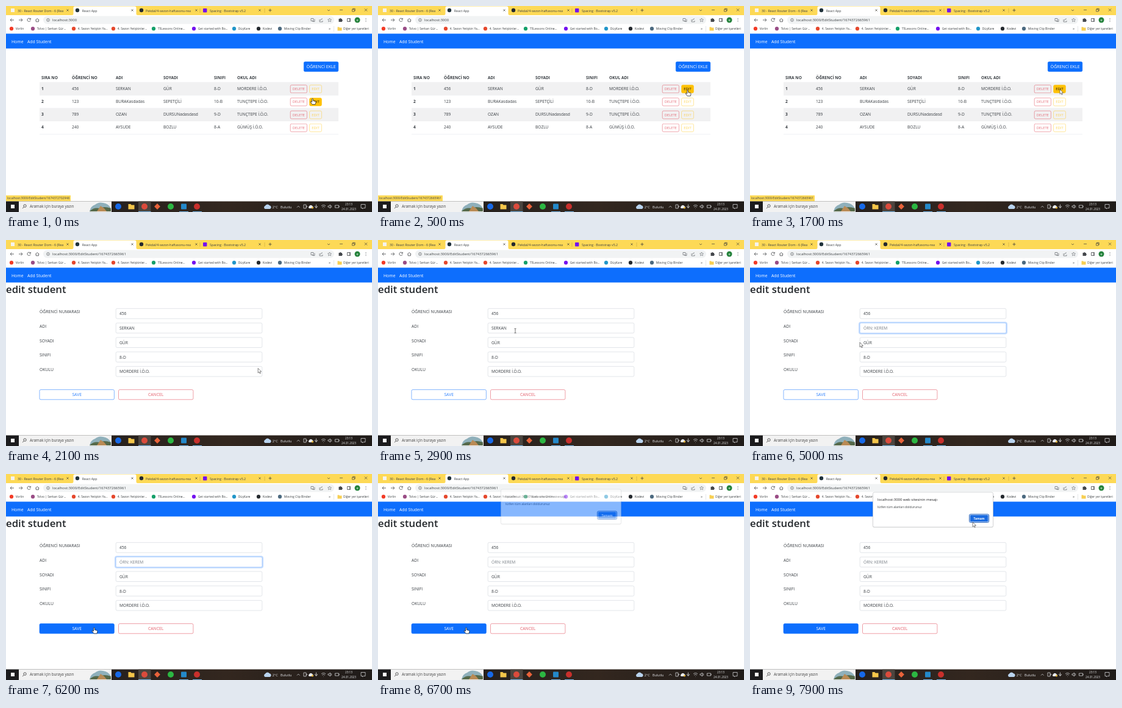
An HTML page that plays this animation: 600x338 px, repeating every 8000 ms.

```html
<!DOCTYPE html>
<html lang="tr">
<head>
<meta charset="utf-8">
<title>React App</title>
<style>
  html, body { margin: 0; width: 100%; height: 100%; overflow: hidden; background: #fff; }
  svg { display: block; width: 100vw; height: 100vh; }
  text { font-family: "Open Sans", "Noto Sans", sans-serif; white-space: pre; }
</style>
</head>
<body>
<svg id="stage" viewBox="0 0 600 338"></svg>
<script>
const LOOP = 8000, TICK = 100;
const INK = '#3a3f44', BLUE = '#0d6efd', RED = '#dc3545', AMBER = '#ffc107', FRAME = '#fdd956';

const box = (x, y, w, h, fill, more = '') =>
  `<rect x="${x}" y="${y}" width="${w}" height="${h}" fill="${fill}" ${more}/>`;
const dot = (x, y, r, fill, more = '') =>
  `<circle cx="${x}" cy="${y}" r="${r}" fill="${fill}" ${more}/>`;
const line = (d, color = '#5f6368', w = 0.8) =>
  `<path d="${d}" fill="none" stroke="${color}" stroke-width="${w}"/>`;
const text = (x, y, s, size = 6.8, fill = INK, more = '') =>
  `<text x="${x}" y="${y}" font-size="${size}" fill="${fill}" ${more}>${s}</text>`;
const MID = ' text-anchor="middle"', BOLD = ' font-weight="700"';

const cross = (x, y, r) => line(`M${x - r} ${y - r}l${2 * r} ${2 * r}m0 ${-2 * r}l${-2 * r} ${2 * r}`, '#44423a', 0.7);

function button(x, y, w, h, label, color, { size = 6.8, on = false, onText = '#fff', pale = 1 } = {}) {
  return `<g opacity="${on ? 1 : pale}">` +
    box(x, y, w, h, on ? color : 'none', `rx="2" stroke="${color}" stroke-width=".6"`) +
    text(x + w / 2, y + h / 2 + size * 0.36, label, size, on ? onText : color, MID) + '</g>';
}

// Browser window

function tabs() {
  const tab = (x, icon, title, closeX) => icon + text(x, 9.6, title, 5.3, '#3c4043') + cross(closeX, 7, 1.6);
  return box(0, 0, 600, 15, FRAME) +
    '<path d="M108 15q2.500 0 2.500-2.500V3q0-2.500 2.500-2.500h98q2.500 0 2.500 2.500v9.500q0 2.500 2.500 2.500z" fill="#fff"/>' +
    tab(19, box(8, 4, 6, 6, '#f5f3ef'), '30 - React Router Dom - 6 (Rea', 101) +
    tab(124.7, dot(117, 7, 3.2, '#20323b'), 'React App', 207) +
    tab(229, dot(222, 7, 3.2, '#24292e'), 'Pekdal/4-sezon-haftasonu-rea', 312) +
    tab(334, box(323, 4, 6.4, 6.4, '#7411f0', 'rx="1"'), 'Spacing · Bootstrap v5.2', 416) +
    line('M318 4v7M424 4v7', '#b59a3c', 0.5) +
    line('M430.500 7h5M433 4.500v5', '#44423a') +
    line('M527 6l2 2 2-2M547 6.500h5M567.500 5.500h3.500v3.500h-3.500zM568.500 5.500v-1.200h3.700V8H571', '#44423a', 0.7) +
    cross(590, 6.5, 2.1);
}

function toolbar(url) {
  return box(0, 15, 600, 30.4, '#fff') +
    line('M13 23H7m2.500-2.500L7 23l2.500 2.500M21 23h6m-2.500-2.500L27 23l-2.500 2.500', '#44474b') +
    line('M40 21.500a2.700 2.700 0 1 0 .2 2.200M40.400 19.800v2.200h-2.200M48.300 23.200l3-2.700 3 2.700M49.200 22.500v3.300h4.200v-3.300', '#44474b') +
    box(61, 16.5, 477, 13, '#f1f3f4', 'rx="6.5"') +
    dot(69, 23, 2.4, 'none', 'stroke="#5f6368" stroke-width=".7"') + line('M69 22.600v1.700M69 21.400v.6') +
    text(76, 25.2, url, 5.95, '#3c4043') +
    line('M500 20.500h4v4h-4zM502.500 25.500h3.500v-4M514 22v4h5v-2M515.500 24q0-3 3.500-3', '#5f6368', 0.7) +
    line('M530.500 20l.9 2 2.100.2-1.600 1.400.5 2.200-1.900-1.200-1.900 1.200.5-2.200-1.600-1.400 2.100-.2z', '#5f6368', 0.6) +
    '<path d="M545.500 21h1.700a1 1 0 0 1 2 0h1.700v1.700a1 1 0 0 1 0 2v1.300h-5.400z" fill="#44474b"/>' +
    line('M559.500 20.500h5v5h-5zM563 20.500v5', '#44474b') +
    dot(576, 23, 4.5, '#24823b') + text(576, 25, 'e', 5.5, '#fff', MID) +
    [20.7, 23, 25.3].map(y => dot(590, y, 0.6, '#5f6368')).join('');
}

function bookmarks() {
  const marks = [
    [9, '#f33b26', 'Vorlin'], [44, '#9a4d86', 'Tolvo | Serkan Gür...'],
    [111, '#e5482d', '4. Sezon Yetişkin Ya...'], [176, '#e5482d', '4. Sezon Yetişkinler...'],
    [242, '#15a06a', 'T5Lessons Online...'], [308, '#7411f0', 'Get started with Bo...'],
    [374, '#2196c9', 'DüşKare'], [414, '#24292e', 'Kodevi'], [449, '#4c6a80', 'Moving Clip Binder']
  ];
  return marks.map(([x, color, label]) => dot(x, 37.2, 3.1, color) + text(x + 6.7, 39, label, 5, '#3c4043')).join('') +
    text(529, 39.2, '»', 6, '#3c4043') + line('M537.500 33v9', '#d5d7da', 0.6) +
    '<path d="M543.500 34.500h2.500l1 1h3.500v5h-7z" fill="#f7cf52"/>' +
    text(553, 39, 'Diğer yer işaretleri', 4.9, '#3c4043');
}

function taskbar() {
  const icons = [[184, '#1769e8'], [227, '#db4b3c'], [270, '#2cb742'], [313, '#c8302c']];
  const white = '#e8eaed';
  return '<linearGradient id="bar"><stop stop-color="#1b1b1d"/><stop offset=".6" stop-color="#33271f"/>' +
    '<stop offset="1" stop-color="#1f1b19"/></linearGradient>' +
    box(0, 320.5, 600, 17.5, 'url(#bar)') +
    box(8, 326, 6, 6, '#fff') +
    box(21, 320.5, 152, 17.5, '#f2f2f2') +
    dot(31, 328, 2.2, 'none', 'stroke="#333" stroke-width=".8"') + line('M29.400 329.700l-2.400 2.500', '#333') +
    text(39, 331.3, 'Aramak için buraya yazın', 6.25, '#454545') +
    '<path d="M137 337q2-9 9-11 6-5 13-3 9 1 13 9v5z" fill="#8fb0bb"/>' +
    '<path d="M137 337q7-7 16-5 8-4 19 0v5z" fill="#55694a"/>' +
    '<path d="M149 337l6-9 6 4 4 5z" fill="#b98a55"/>' +
    box(217, 320.5, 20.5, 17.5, '#4c453f') +
    icons.map(([x, c]) => dot(x, 329, 5, c)).join('') +
    '<path d="M200.500 325h4l1 1.500h5v7h-10z" fill="#f5c64a"/>' +
    box(244.5, 325.5, 7, 7, '#e8623a', 'transform="rotate(45 248 329)"') +
    box(287, 324.5, 9, 9, '#2489ca', 'rx="1"') +
    [[217, 20.5], [284, 15], [306, 15]].map(([x, w]) => box(x, 337, w, 1, '#76b9ed')).join('') +
    '<path d="M425 333a2.700 2.700 0 0 1 0-5.200 4 4 0 0 1 7-.5 2.900 2.900 0 0 1 .5 5.700z" fill="#b9d3ee"/>' +
    text(436.7, 331.5, '2°C', 5.5, white) + text(450, 331.5, 'Bulutlu', 5.5, white) +
    line('M477 330.500l2.300-2.300 2.300 2.300M488 326h4v6h-4zM492 328l2 1-2 1.500', white, 0.7) +
    '<path d="M497 332a2 2 0 0 1 0-3.500 3 3 0 0 1 5.500 0 2 2 0 0 1 .5 3.500z" fill="#e8eaed"/>' +
    dot(502.5, 331, 1.5, '#f2b632') +
    line('M508.500 325.500v6m-1.700-3.500v2q1.700 2 3.400 0v-2', white, 0.7) +
    line('M517 328a5 5 0 0 1 7 0M518.300 330a3 3 0 0 1 4.400 0M520.500 332v.5', white, 0.7) +
    line('M528 328h1.500l2-2v6l-2-2H528zM533 327q1.500 2 0 4M539.500 327h6v4h-6zM546 328v2', white, 0.7) +
    text(562, 327.1, '23:13', 4.7, white, MID) + text(562, 335.3, '24.01.2023', 4.7, white, MID) +
    line('M582 325.500h7v6h-3l-1.500 1.500v-1.500H582z', white, 0.7);
}

const navbar = () => box(0, 45.4, 600, 24.3, BLUE) +
  text(9, 60.7, 'Home', 6.9, '#fff') + text(35, 60.7, 'Add Student', 6.85, '#fff');

// Pages

const COLS = [58, 108, 180, 258, 341, 379];
const HEADS = ['SIRA NO', 'ÖĞRENCİ NO', 'ADI', 'SOYADI', 'SINIFI', 'OKUL ADI'];
const STUDENTS = [
  ['456', 'SERKAN', 'GÜR', '8-D', 'MORDERE İ.Ö.O.'],
  ['123', 'BURAKasdadas', 'SEPETÇİLİ', '10-B', 'TUNÇTEPE İ.Ö.O.'],
  ['789', 'OZAN', 'DURSUNadasdasd', '9-D', 'TUNÇTEPE İ.Ö.O.'],
  ['240', 'AYSUDE', 'BOZLU', '8-A', 'GÜMÜŞ İ.Ö.O.']
];

function listPage(hot) {
  const row = (student, i) => {
    const y = 125.5 + i * 21.2;
    return box(55, y, 490, 21.2, i % 2 ? '#fff' : '#f1f1f2') +
      line(`M55 ${y + 21.2}h490`, '#dee2e6', 0.5) +
      [i + 1, ...student].map((s, c) => text(COLS[c], y + 12.1, s, 6.65, INK, c ? '' : BOLD)).join('') +
      button(466.2, y + 4.2, 27.2, 13, 'DELETE', RED, { size: 5.8, pale: 0.72 }) +
      button(497.6, y + 4.2, 19.8, 13, 'EDIT', AMBER, { size: 5.8, on: i === hot, onText: '#111', pale: 0.68 });
  };
  return button(488.3, 91.6, 56.5, 16, 'ÖĞRENCİ EKLE', BLUE, { on: true, size: 7.05 }) +
    HEADS.map((s, c) => text(COLS[c], 119.7, s, 6.55, INK, BOLD)).join('') +
    line('M55 125.300h490', '#dee2e6', 0.5) + STUDENTS.map(row).join('');
}

const LABELS = ['ÖĞRENCİ NUMARASI', 'ADI', 'SOYADI', 'SINIFI', 'OKULU'];

function formPage(t, pointerX) {
  const focus = t >= 3300 && t < 6600, empty = t >= 4300;
  const caret = (t >= 4300 && t < 5000) || (t >= 5500 && t < 6000);
  const field = (label, i) => {
    const y = 112.4 + i * 23.75, active = i === 1 && focus;
    const hint = i === 1 && empty;
    let out = text(55, y + 7.8, label, 6.85);
    if (active) out += box(179, y - 1, 242, 18.6, 'none', 'rx="2.800" stroke="#c2dbfe" stroke-width="2"');
    out += box(180.2, y, 239.6, 16.6, '#fff', `rx="2" stroke="${active ? '#86b7fe' : '#ced4da'}" stroke-width=".6"`);
    if (i === 1 && t >= 3400 && !empty) {
      const from = Math.max(185.5, Math.min(214, pointerX));
      out += box(from, y + 4, 214 - from, 9, '#a9cdfb');
    }
    out += text(186, y + 11, hint ? 'ÖRN: KEREM' : STUDENTS[0][i], 6.65, hint ? '#787f86' : INK);
    if (i === 1 && caret) out += box(185.7, y + 4, 0.6, 9, '#222');
    return out;
  };
  return text(0, 87.3, 'edit student', 16.8, '#212529', 'font-weight="600"') +
    LABELS.map(field).join('') +
    button(55, 245.6, 122.4, 16.2, 'SAVE', BLUE, { on: t >= 6000, pale: 0.85 }) +
    button(184.5, 245.6, 122.4, 16.2, 'CANCEL', RED, { pale: 0.8 });
}

function dialog(t) {
  if (t < 6700) return '';
  const p = Math.min(1, 0.5 + (t - 6700) / 200);
  return `<g opacity="${p}" transform="translate(0 ${10 * (p - 1)})">` +
    box(200.8, 30.6, 198.4, 57.4, '#000', 'rx="3" opacity=".12"') +
    box(201.5, 30, 197, 57, '#fff', 'rx="2.500" stroke="#c4c6ca" stroke-width=".6"') +
    text(209, 44, 'localhost:3000 web sitesinin mesajı', 6, '#202124') +
    text(209, 56.4, 'lütfen tüm alanları doldurunuz', 5.1, '#3c4043') +
    box(359.6, 66, 32, 13.4, '#fff', 'rx="2" stroke="#1558b8" stroke-width="1"') +
    box(360.8, 67.2, 29.6, 11, '#1a6be0', 'rx="1.300"') +
    text(375.6, 74.5, 'Tamam', 4.9, '#fff', MID + BOLD) + '</g>';
}

// Pointer: time, x, y, shape used from that time on

const SHAPES = {
  hand: '<path d="M-.9 1q0-1 .9-1t.9 1v2.800l3.700.9q1 .4.8 1.700l-.8 3.400h-5L-3.300 6q-.4-1.100.9-1l1.500 1z" fill="#fff" stroke="#111" stroke-width=".7"/>',
  arrow: '<path d="M0 0v7.600l1.800-1.600 1.200 2.700 1.300-.6-1.200-2.600h2.400z" fill="#fff" stroke="#333" stroke-width=".6"/>',
  beam: line('M-1.500-3.600h1.200l.3.400.3-.4h1.200M0-3.200v6.400M-1.500 3.600h1.200l.3-.4.3.4h1.200', '#333', 0.7)
};
const PATH = [
  [0, 502.5, 151.7, 'hand'], [600, 508, 136.8, 'arrow'], [1800, 508, 136.8, 'arrow'],
  [2500, 267, 324, 'arrow'], [2800, 231, 158, 'beam'], [2900, 225, 149, 'beam'],
  [3100, 225, 149, 'beam'], [3500, 213, 147, 'beam'], [3600, 213, 147, 'beam'],
  [3800, 183, 147, 'beam'], [3900, 183, 147, 'beam'], [4200, 178, 152, 'arrow'],
  [4700, 180, 167, 'arrow'], [5000, 180, 168, 'arrow'], [5300, 180, 168, 'arrow'],
  [5900, 147, 248, 'hand'], [6200, 144.5, 252, 'hand'], [6800, 144.5, 252, 'hand'],
  [6900, 150, 246, 'arrow'], [7300, 307, 119, 'arrow'], [7700, 382, 76, 'arrow'],
  [7900, 365, 79, 'arrow'], [LOOP, 365, 79, 'arrow']
];

function pointer(t) {
  const i = PATH.findIndex(k => k[0] > t);
  const [t0, x0, y0, shape] = PATH[i - 1], [t1, x1, y1] = PATH[i];
  const u = (t - t0) / (t1 - t0), e = u * u * (3 - 2 * u);
  return { x: x0 + (x1 - x0) * e, y: y0 + (y1 - y0) * e, shape };
}

function scene(t) {
  const { x, y, shape } = pointer(t);
  const hot = y < 143.5 ? 0 : 1;
  const edit = id => 'localhost:3000/EditStudent/' + id;
  const first = 1674372665961, second = 1674372702948;
  let page = formPage(t, x);
  if (t < 1800) {
    page = listPage(hot) + box(0, 310.7, 106, 9.8, FRAME) +
      text(2, 317.3, edit(hot ? second : first), 5.03, '#3c4043');
  }
  return box(0, 0, 600, 338, '#fff') + tabs() + toolbar(t < 1700 ? 'localhost:3000' : edit(first)) +
    bookmarks() + navbar() + page + taskbar() + dialog(t) +
    `<g transform="translate(${x} ${y})">${SHAPES[shape]}</g>`;
}

const stage = document.getElementById('stage');
let shown = -1;
function frame() {
  const t = Math.floor(performance.now() % LOOP / TICK) * TICK;
  if (t !== shown) stage.innerHTML = scene(shown = t);
  requestAnimationFrame(frame);
}
frame();
</script>
</body>
</html>
```
